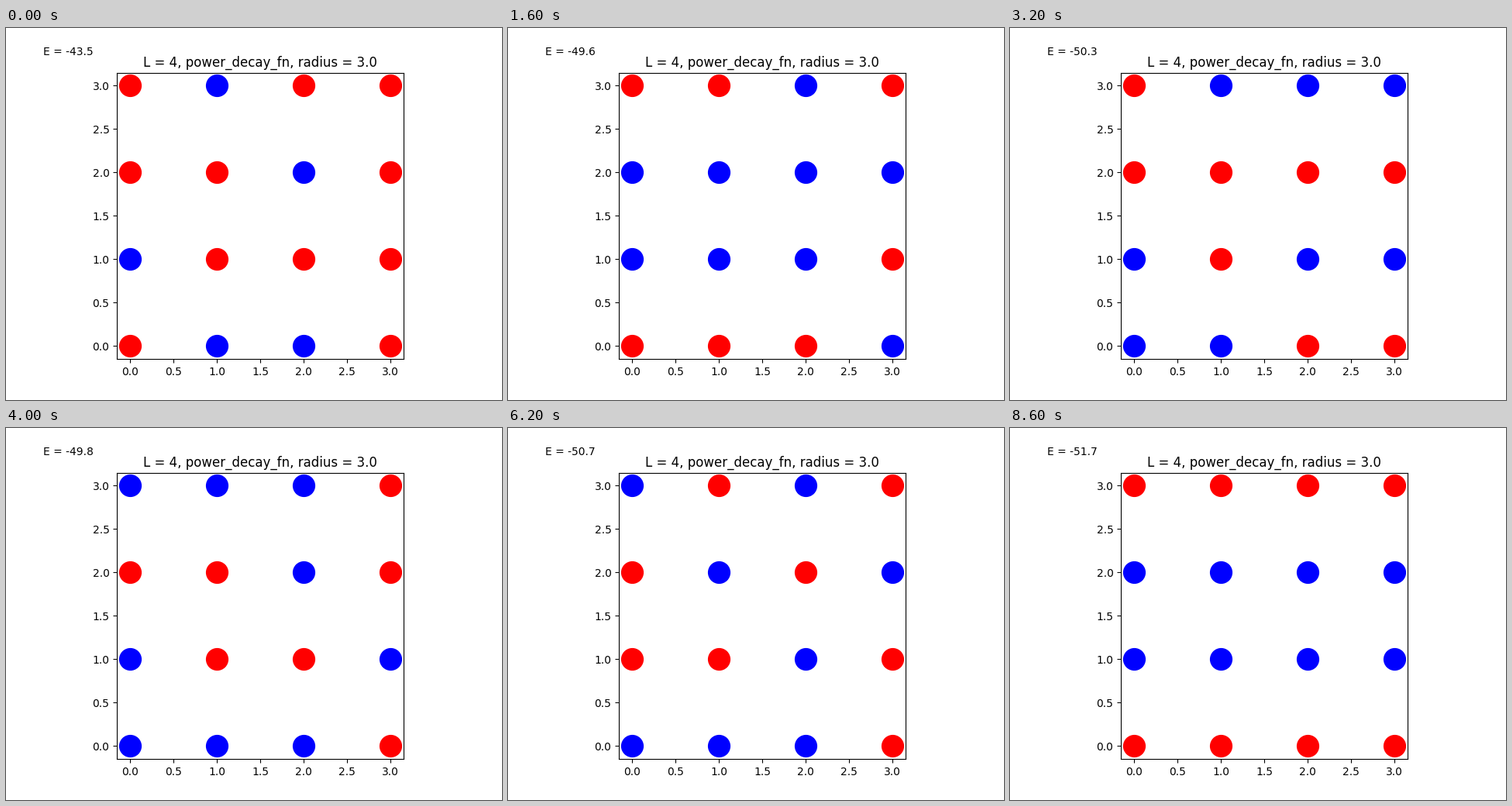
A matplotlib script that plays this animation: 640x480 px, repeating every 9.8 s.

```python
import random

import numpy as np
import matplotlib.pyplot as plt
from matplotlib.animation import FuncAnimation

SIZE = 4
FRAMES, INTERVAL = 49, 200
REPEATED, LAST_STEP = 39, 42

# Spins by step, rows from top to bottom
KEY_STATES = {
    0: "RBRR RRBR BRRR RBBR",
    8: "RRBR BBBB BBBR RRRB",
    13: "RBBB RRRB BRBR BBRB",
    20: "BBBR RRBR BRRB BBBR",
    24: "BBRR BRBR RRRB RBBB",
    31: "BRBR RBRB RRBR BBBR",
    LAST_STEP: "RRRR BBBB BBBB RRRR",
}
ENERGY_STEPS = [0, 2, 5, 8, 13, 16, 20, 24, 28, 31, 36, LAST_STEP]
ENERGIES = [-43.5, -48.2, -50.1, -49.6, -50.4, -50.3, -49.8,
            -50.7, -51.1, -50.7, -51.2, -51.7]


def build_states():
    """Flip the spins that differ between key states a few at a time."""
    rng = random.Random(4)
    keys = [(step, list(text.replace(" ", ""))) for step, text in KEY_STATES.items()]
    states = [keys[0][1]]
    for (start, old), (end, new) in zip(keys, keys[1:]):
        sites = [i for i in range(SIZE * SIZE) if old[i] != new[i]]
        rng.shuffle(sites)
        if end == LAST_STEP:
            sites.sort(key=lambda i: i < SIZE * (SIZE - 1))
        for step in range(1, end - start + 1):
            flipped = sites[:round(len(sites) * step / (end - start))]
            states.append([new[i] if i in flipped else old[i]
                           for i in range(SIZE * SIZE)])
    return states


STATES = build_states()

fig, ax = plt.subplots(figsize=(6.4, 4.8), dpi=100)
ax.set_aspect("equal")
ax.set(xlim=(-0.15, 3.15), ylim=(-0.15, 3.15))
ticks = np.arange(0, 3.5, 0.5)
ax.set_xticks(ticks)
ax.set_yticks(ticks)
ax.set_title("L = 4, power_decay_fn, radius = 3.0")
energy_text = ax.text(-1, 3.35, "")
dots = [ax.plot(i % SIZE, SIZE - 1 - i // SIZE, "o", markersize=20)[0]
        for i in range(SIZE * SIZE)]


def update(frame):
    step = min(frame - (frame >= REPEATED), LAST_STEP)
    for dot, spin in zip(dots, STATES[step]):
        dot.set_color("red" if spin == "R" else "blue")
    energy = np.interp(step, ENERGY_STEPS, ENERGIES)
    energy_text.set_text(f"E = {energy:.1f}")
    return [*dots, energy_text]


anim = FuncAnimation(fig, update, frames=FRAMES, interval=INTERVAL,
                     init_func=lambda: update(0), repeat=True, repeat_delay=0)
plt.show()
```
